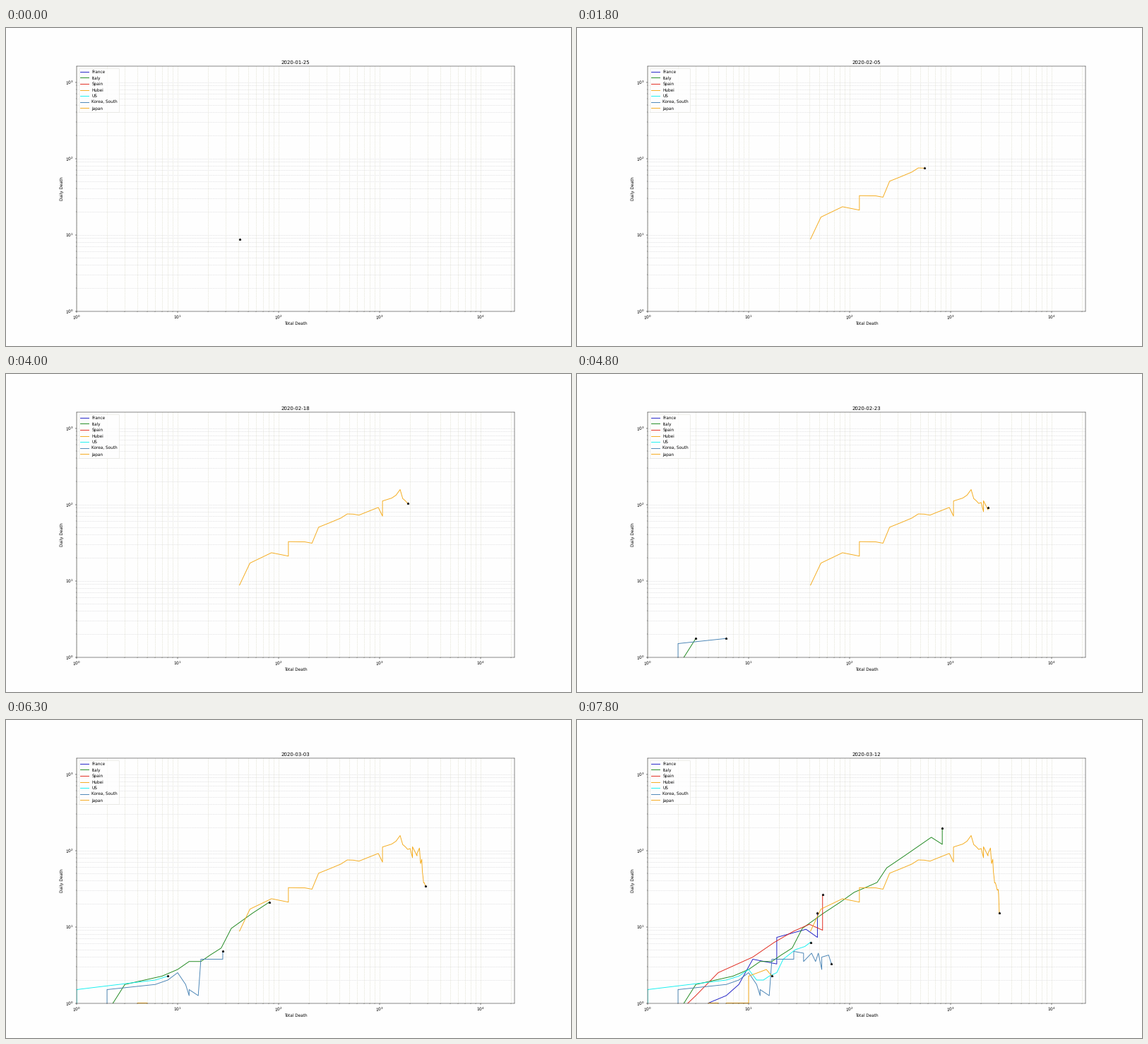
Write a matplotlib script that moves like this. It is 800 px wide and 450 px high and loops after 8000 ms.

```python
import numpy as np
import matplotlib.pyplot as plt
from matplotlib.animation import FuncAnimation

S = 5 / 6          # type and stroke scale: 1920 px layout shown at 800 px
PAPER = "#fefefe"
DAYS = 52          # day 0 is 22 January
START = np.datetime64("2020-01-25")

plt.rcParams.update({
    "font.family": "DejaVu Sans",
    "font.size": 10 * S,
    "text.hinting": "none",
    "axes.linewidth": 0.8 * S,
    "axes.titlepad": 6 * S,
    "axes.labelpad": 4 * S,
    "patch.linewidth": 1.0 * S,
    "xtick.major.pad": 2.7 * S,
    "ytick.major.pad": 3.5 * S,
})
for axis in ("xtick", "ytick"):
    plt.rcParams.update({
        f"{axis}.major.size": 3.5 * S,
        f"{axis}.minor.size": 2 * S,
        f"{axis}.major.width": 0.8 * S,
        f"{axis}.minor.width": 0.6 * S,
    })

# name, colour, turning points {day: total}, days without a new report
REGIONS = [
    ("France", "#1a1ac4",
     {35: 2, 39: 2, 43: 6, 45: 11, 46: 19, 49: 48, 51: 79}, (42, 47, 50)),
    ("Italy", "#1a861a",
     {30: 1, 32: 3, 33: 7, 37: 21, 39: 34, 45: 233, 49: 827, 51: 1266},
     (50,)),
    ("Spain", "#e02418",
     {41: 1, 44: 5, 47: 28, 49: 54, 51: 133}, (50,)),
    ("Hubei", "#f5aa18",
     {0: 17, 4: 52, 6: 125, 10: 249, 12: 414, 20: 1068, 24: 1596, 31: 2346,
      35: 2615, 40: 2803, 46: 2986, 51: 3062}, (1, 7, 21, 30, 32)),
    ("US", "#10f0f0",
     {38: 1, 40: 6, 47: 22, 49: 36, 51: 47}, (39,)),
    ("Korea, South", "#4682b4",
     {29: 1, 32: 6, 35: 12, 39: 17, 40: 28, 44: 42, 50: 66},
     (31, 37, 41, 43, 48)),
    ("Japan", "#f5a614",
     {22: 1, 34: 1, 36: 4, 39: 6, 46: 6, 47: 10, 49: 15, 51: 19}, (37, 48)),
]


def curve(points, pauses):
    """Quadratic growth between turning points; y is the four-day mean."""
    roots = np.sqrt(list(points.values()))
    total = np.interp(np.arange(DAYS), list(points), roots, left=0) ** 2
    total = np.round(total)
    for day in pauses:
        total[day] = total[day - 1]
    daily = (total[4:] - total[:-4]) / 4
    return np.maximum(total[3:-1], 0.01), np.maximum(daily, 0.01)


fig, ax = plt.subplots(figsize=(16, 9), dpi=50, facecolor=PAPER)
ax.set_facecolor(PAPER)
ax.set_xscale("log")
ax.set_yscale("log")
ax.set_xlim(1, 10 ** (620 / 143))
ax.set_ylim(1, 10 ** (346.5 / 108))
ax.set_xlabel("Total Death", labelpad=3 * S)
ax.set_ylabel("Daily Death")
ax.set_axisbelow(True)
dots = (0, (1.6, 1.4))
ax.grid(True, which="both", axis="x", color="#e0e0d0", lw=1.1, ls=dots)
ax.grid(True, which="both", axis="y", color="#dedee0", lw=1.1, ls=dots)
title = ax.set_title("")

tracks = []
for name, color, points, pauses in REGIONS:
    line, = ax.plot([], [], color=color, lw=1.6 * S, label=name)
    star, = ax.plot([], [], "k*", ms=6 * S, mew=1.0 * S, zorder=3)
    tracks.append((line, star, *curve(points, pauses)))

legend = ax.legend(loc="upper left", labelspacing=0.48,
                   facecolor=PAPER, edgecolor="#dcdcd4")


def draw(i):
    day = (6 * i + 3) // 10     # six days a second on a 100 ms clock
    title.set_text(str(START + day))
    for line, star, x, y in tracks:
        line.set_data(x[:day + 1], y[:day + 1])
        star.set_data(x[day:day + 1], y[day:day + 1])
    return []


anim = FuncAnimation(fig, draw, frames=80, interval=100, repeat=True)
plt.show()
```
